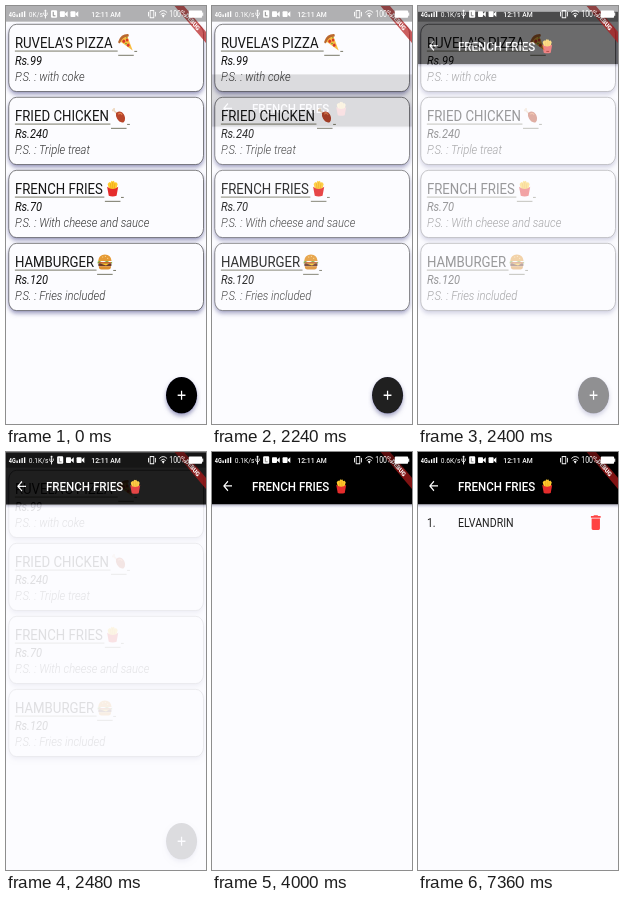
Animation, 200 px wide and 418 px high, one loop 8 s. Source, as an HTML page:

```html
<!DOCTYPE html>
<html lang="en">
<head>
<meta charset="utf-8">
<style>
  html, body { margin: 0; width: 100%; height: 100%; overflow: hidden; background: #fcfcff; }
  svg { display: block; width: 100%; height: 100%; font-family: Roboto, sans-serif; }
  text { white-space: pre; }
  .title { font-size: 23.8px; fill: #151515; }
  .price { font-size: 20px; font-style: italic; fill: #111; }
  .note { font-size: 20.2px; font-style: italic; font-weight: 300; fill: #333; }
  .rule { stroke: #55553f; stroke-width: 1.3; }
  .row { font-size: 19.1px; fill: #222; }
  #status { fill: #fff; font-size: 12px; }
</style>
</head>
<body>
<!-- Laid out on a 360 x 640 phone screen that fills the stage -->
<svg viewBox="0 0 360 640" preserveAspectRatio="none">
  <defs>
    <filter id="lift" x="-10%" y="-15%" width="120%" height="140%">
      <feDropShadow dx="0" dy="4" stdDeviation="3.6" flood-color="#5c5c94" flood-opacity=".6"/>
    </filter>
    <linearGradient id="barShadow" x2="0" y2="1">
      <stop stop-color="#777790" stop-opacity=".6"/>
      <stop offset="1" stop-color="#ccccec" stop-opacity="0"/>
    </linearGradient>
    <g id="pizza">
      <path d="M3 11Q7 3 16 2L26 25Z" fill="#f9bd42"/>
      <path d="M2 12Q6 2 17 2" fill="none" stroke="#b9682f" stroke-width="4" stroke-linecap="round"/>
      <g fill="#d83b2b"><circle cx="10" cy="11" r="2.6"/><circle cx="16" cy="9" r="2.3"/><circle cx="18" cy="17" r="2.4"/></g>
      <path d="M13 14l2 1M15 5l1 1" stroke="#558b2f" stroke-width="2"/>
    </g>
    <g id="drumstick">
      <path d="M5 5l7 6" stroke="#ecd3b8" stroke-width="2.6"/>
      <g fill="#ecd3b8"><circle cx="3.500" cy="5" r="1.7"/><circle cx="5.500" cy="3" r="1.7"/></g>
      <path d="M9 9Q18 4 23 11Q28 18 23 23Q16 25 11 18Q8 14 9 9Z" fill="#b8452b"/>
      <path d="M13 11Q17 8 20 12" fill="none" stroke="#e4804c" stroke-width="2"/>
    </g>
    <g id="fries">
      <path d="M5 6l3-3 2 1 2-3 2 1 2-1 2 3 2-1 3 3-3 10H8Z" fill="#ffcb2e"/>
      <path d="M10 5l1 8M14 3v10M18 5l-1 8" stroke="#e99a13"/>
      <path d="M4 10Q14 17 24 10L21 24Q14 26 7 24Z" fill="#e52c2c"/>
    </g>
    <g id="burger">
      <path d="M2 12Q3 2 14 2T26 12Z" fill="#e59a35"/>
      <path d="M1 13Q4 11 7 13T14 13T21 13T27 13V16H1Z" fill="#75a832"/>
      <path d="M3 14H25V16H3Z" fill="#e64a2e"/>
      <rect x="2" y="16" width="24" height="4" rx="2" fill="#68392b"/>
      <path d="M6 16H22L16 19Z" fill="#ffc928"/>
      <path d="M3 20H25Q25 25 20 25H8Q3 25 3 20Z" fill="#dc8d2e"/>
      <path d="M9 6h2M14 5h2M18 8h2" stroke="#ffe4a4" stroke-width="1.3"/>
    </g>
    <g id="camera"><rect width="9" height="9" y="8" rx="1.5"/><path d="M9 12l5-4v9l-5-4Z"/></g>
  </defs>

  <rect width="360" height="640" fill="#fcfcff"/>
  <g id="cards"></g>
  <g>
    <circle cx="316" cy="596" r="28" filter="url(#lift)"/>
    <path d="M309 596h14M316 589v14" stroke="#fff" stroke-width="2.2"/>
  </g>

  <g id="page">
    <rect width="360" height="640" fill="#fcfcff"/>
    <rect y="80" width="360" height="6" fill="url(#barShadow)"/>
    <rect width="360" height="80"/>
    <path transform="translate(16 40)" fill="#fff" d="M20 11H7.83l5.59-5.59L12 4l-8 8 8 8 1.41-1.41L7.83 13H20z"/>
    <text x="72" y="59.5" font-size="20.8" font-weight="500" fill="#fff">FRENCH FRIES</text>
    <use href="#fries" transform="translate(220 41) scale(.9)"/>
    <g id="entry">
      <text class="row" x="16" y="115.5">1.</text>
      <text class="row" x="72" y="115.5">ELVANDRIN</text>
      <path transform="translate(305 93) scale(1.25)" fill="#ff4343" d="M6 19c0 1.1.9 2 2 2h8c1.1 0 2-.9 2-2V7H6zM19 4h-3.5l-1-1h-5l-1 1H5v2h14z"/>
    </g>
  </g>

  <g transform="translate(360 0) rotate(45)">
    <rect x="-42" y="28" width="84" height="12" fill="#b71c1c" fill-opacity=".7"/>
    <text y="37.7" font-size="10.2" font-weight="900" text-anchor="middle" fill="#fff">DEBUG</text>
  </g>

  <rect width="360" height="24" fill-opacity=".3"/>
  <g id="status">
    <text x="5" y="16.5" font-size="10" font-weight="700">4G</text>
    <path d="M20 17v-4M24.500 17v-6M29 17v-8M33.500 17v-9" stroke="#fff" stroke-width="2.4"/>
    <text id="speed" x="41" y="16.5"></text>
    <g id="icons">
      <path d="M82 6v13M79 10v3l3 3 3-3v-3M80.500 8l1.500-2 1.500 2" fill="none" stroke="#fff" stroke-width="1.5"/>
      <rect x="92" y="6.500" width="11" height="11.5" rx="2"/>
      <path d="M96 9v6h4" fill="none" stroke="#777" stroke-width="1.4"/>
      <use href="#camera" x="108"/>
      <use href="#camera" x="127"/>
    </g>
    <text x="153.500" y="16.5" font-size="12.3" font-weight="500">12:11 AM</text>
    <g fill="none" stroke="#fff" stroke-width="1.5">
      <rect x="259.500" y="7" width="6.500" height="11"/>
      <path d="M256.500 9v7M269 9v7M276 10q7-6 14 0M278.500 13q4.500-4 9 0"/>
    </g>
    <path d="M280.500 14.500q2.500-2 5 0L283 18Z"/>
    <text x="294" y="16.5" font-size="12.5">100%</text>
    <rect x="329" y="7" width="24" height="11" rx="1.5"/>
    <rect x="353" y="10" width="2" height="5"/>
  </g>
</svg>
<script>
const $ = id => document.getElementById(id);
const LOOP = 8000, PUSH_START = 2130, PUSH_TIME = 380;

const dishes = [
  ["RUVELA'S PIZZA", 'pizza', 202, 99, 'with coke'],
  ['FRIED CHICKEN', 'drumstick', 189, 240, 'Triple treat'],
  ['FRENCH FRIES', 'fries', 178, 70, 'With cheese and sauce'],
  ['HAMBURGER', 'burger', 164, 120, 'Fries included']
];

$('cards').innerHTML = dishes.map(([name, icon, x, price, note], i) => `
  <g transform="translate(0 ${28 + i * 111.8})">
    <rect x="5" width="350.5" height="103" rx="14" fill="#fcfcff" stroke="#333" filter="url(#lift)"/>
    <text class="title" x="16" y="37">${name}</text>
    <use href="#${icon}" x="${x}" y="15"/>
    <path class="rule" d="M16 41H${x - 1}M${x} 47.5h28M${x + 29} 41.500h5"/>
    <text class="price" x="16" y="62">Rs.${price}</text>
    <text class="note" x="16" y="87.5">P.S. : ${note}</text>
  </g>`).join('');

// CSS-style cubic Bezier easing, solved by bisection
function bezier(x1, y1, x2, y2) {
  const at = (a, b, s) => 3 * a * s * (1 - s) ** 2 + 3 * b * s * s * (1 - s) + s ** 3;
  return x => {
    let lo = 0, hi = 1;
    for (let i = 0; i < 24; i++) {
      const mid = (lo + hi) / 2;
      if (at(x1, x2, mid) < x) lo = mid; else hi = mid;
    }
    return at(y1, y2, (lo + hi) / 2);
  };
}
const fadeIn = bezier(.42, 0, 1, 1);
const slideUp = bezier(.4, 0, .2, 1);

function draw(now) {
  const t = now % LOOP;
  const push = Math.min(1, Math.max(0, (t - PUSH_START) / PUSH_TIME));
  $('page').setAttribute('opacity', push === 1 ? 1 : push && fadeIn(push));
  $('page').setAttribute('transform', `translate(0 ${push === 1 ? 0 : 160 * (1 - slideUp(push))})`);
  $('entry').setAttribute('visibility', t < 4320 ? 'hidden' : 'visible');
  $('speed').textContent = t < 2160 ? '0K/s' : t < 4800 ? '0.1K/s' : '0.6K/s';
  $('icons').setAttribute('transform', `translate(${t < 2160 ? -11 : 0} 0)`);
}

function tick() {
  draw(performance.now());
  requestAnimationFrame(tick);
}
tick();
</script>
</body>
</html>
```
